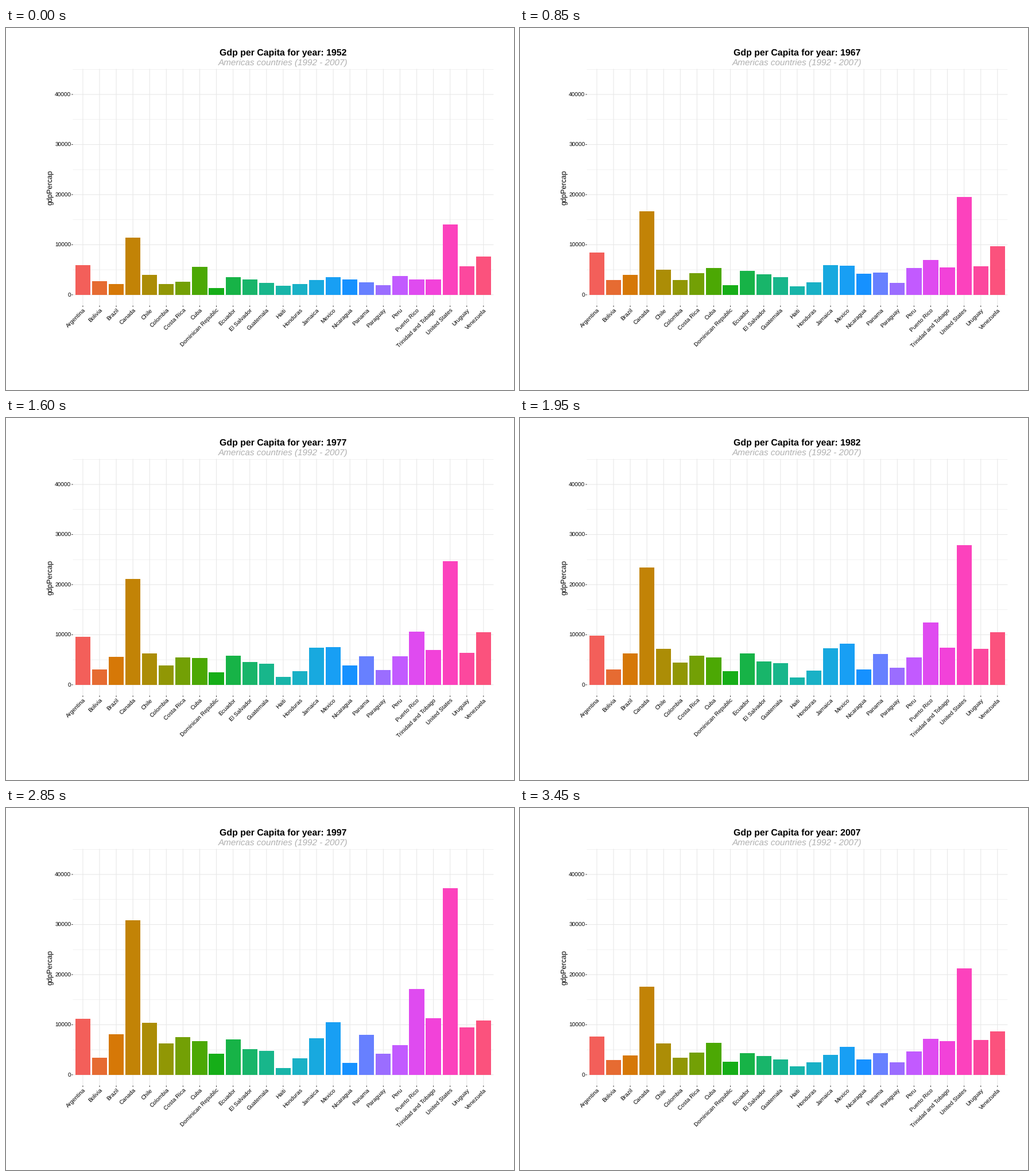
A matplotlib script that plays this animation: 885x632 px, repeating every 5000 ms.

```python
import math

import matplotlib.pyplot as plt
import numpy as np
from matplotlib.animation import FuncAnimation
from matplotlib.patches import Rectangle

W, H, DPI = 885, 632, 64
FRAMES, INTERVAL = 100, 50
YEARS = np.arange(1952, 2008, 5)
CYCLE, HOLD, LAST = 6, 2, 69  # frames per state, still frames, final moving frame

LEFT, RIGHT, TOP, BOTTOM = 116.5, 849.3, 71.4, 484.7
ZERO_Y, SCALE = 465.8, 0.008745
FIRST_X, STEP_X, BAR_W = 133.9, 29.08, 26.17
GRID, TICK, GREY = "#e8e8e8", "#262626", "#b0b0b0"

# GDP per person in the key years; growth is steady in between
KEY_YEARS = [1952, 1972, 1994.5, 2007]
KEY_GDP = {
    "Argentina": (5911, 9443, 10140, 12779),
    "Bolivia": (2677, 2980, 3140, 3822),
    "Brazil": (2109, 4986, 7450, 9066),
    "Canada": (11367, 18971, 27650, 36319),
    "Chile": (3940, 5494, 8860, 13172),
    "Colombia": (2144, 3265, 5780, 7007),
    "Costa Rica": (2627, 5118, 6420, 9645),
    "Cuba": (5587, 5305, 5510, 8948),
    "Dominican Republic": (1398, 2190, 3330, 6025),
    "Ecuador": (3522, 5281, 7270, 6873),
    "El Salvador": (3048, 4520, 4800, 5728),
    "Guatemala": (2428, 4031, 4560, 5186),
    "Haiti": (1840, 1654, 1400, 1202),
    "Honduras": (2195, 2530, 3120, 3548),
    "Jamaica": (2899, 7434, 7260, 7321),
    "Mexico": (3478, 6809, 9620, 11978),
    "Nicaragua": (3112, 4689, 2210, 2749),
    "Panama": (2480, 5364, 6870, 9809),
    "Paraguay": (1953, 2523, 4220, 4173),
    "Peru": (3759, 5938, 5140, 7409),
    "Puerto Rico": (3082, 9123, 15820, 19329),
    "Trinidad and Tobago": (3023, 6619, 8080, 18009),
    "United States": (13990, 21806, 33890, 42952),
    "Uruguay": (5717, 5703, 8680, 10611),
    "Venezuela": (7690, 10505, 10450, 11416),
}

gdp = np.exp([np.interp(YEARS, KEY_YEARS, np.log(v)) for v in KEY_GDP.values()])

plt.rcParams["font.family"] = "Liberation Sans"
plt.rcParams["text.hinting"] = "none"

fig = plt.figure(figsize=(W / DPI, H / DPI), dpi=DPI, facecolor="white")
ax = fig.add_axes([0, 0, 1, 1])
ax.set_xlim(0, W)
ax.set_ylim(H, 0)
ax.axis("off")


def hue_color(hue, chroma=100, light=65):
    """Polar CIE-LUV colour in a display space with gamma 1.8."""
    angle = math.radians(hue)
    u = chroma * math.cos(angle) / (13 * light) + 0.1978
    v = chroma * math.sin(angle) / (13 * light) + 0.4683
    y = ((light + 16) / 116) ** 3
    x = 9 * y * u / (4 * v)
    z = 3 * y / v - x / 3 - 5 * y
    to_rgb = np.array([[3.2405, -1.5371, -0.4985],
                       [-0.9693, 1.8760, 0.0416],
                       [0.0556, -0.2040, 1.0572]])
    to_display = np.array([[0.972, 0.0252, 0.003],
                           [-0.019, 1.05, -0.033],
                           [0.0015, 0.0012, 0.997]])
    rgb = np.clip(to_rgb @ [x, y, z], 0, 1)
    return tuple(np.clip(to_display @ rgb, 0, 1) ** (1 / 1.8))


def pt(px):
    return px * 72 / DPI


def line(xs, ys, color, width, z):
    ax.plot(xs, ys, color=color, lw=pt(width), zorder=z, snap=False,
            solid_capstyle="butt")


def label(x, y, s, px, ha="center", **kw):
    return ax.text(x, y, s, fontsize=pt(px), ha=ha, va="baseline",
                   rotation_mode="anchor", **kw)


def value_y(value):
    return ZERO_Y - value * SCALE


for value in range(5000, 45001, 10000):
    line([LEFT, RIGHT], [value_y(value)] * 2, GRID, 0.6, 1)
for value in range(0, 40001, 10000):
    y = value_y(value)
    line([LEFT, RIGHT], [y, y], GRID, 1.1, 1)
    line([LEFT - 2.2, LEFT], [y, y], TICK, 1, 2)
    label(113.3, y + 3.7, str(value), 10.1, ha="right")

bars = []
for i, name in enumerate(KEY_GDP):
    x = FIRST_X + i * STEP_X
    line([x, x], [TOP, BOTTOM], GRID, 1.1, 1)
    line([x, x], [BOTTOM, BOTTOM + 2.2], TICK, 1, 2)
    label(x + 5.1, 493.2, name, 10.1, ha="right", rotation=45)
    bar = Rectangle((x - BAR_W / 2, ZERO_Y), BAR_W, 0, lw=0, zorder=3,
                    snap=True, fc=hue_color(15 + i * 360 / len(KEY_GDP)))
    bars.append(ax.add_patch(bar))

title = label(482.8, 47.6, "", 15.85, weight="bold")
label(482.6, 65.3, "Americas countries (1992 - 2007)", 15.2,
      style="italic", color=GREY)
label(80.8, 278.4, "gdpPercap", 12.6, rotation=90)


def timeline(frame):
    """Return the state index and the progress towards the next state."""
    state, step = divmod(min(frame, LAST), CYCLE)
    moved = max(0, step - HOLD + 1)
    if state == len(YEARS) - 1 and moved:
        moved += 1  # the way back to the start runs one step ahead
    if moved == 4:
        return state + 1, 0.0
    return state, moved / 4


def update(frame):
    state, p = timeline(frame)
    now, after = gdp[:, state], gdp[:, (state + 1) % len(YEARS)]
    for bar, value in zip(bars, now + (after - now) * p):
        bar.set_height(-value * SCALE)
    title.set_text(f"Gdp per Capita for year: {YEARS[state]}")
    return bars + [title]


anim = FuncAnimation(fig, update, frames=FRAMES, interval=INTERVAL,
                     repeat=True, repeat_delay=0)
plt.show()
```
